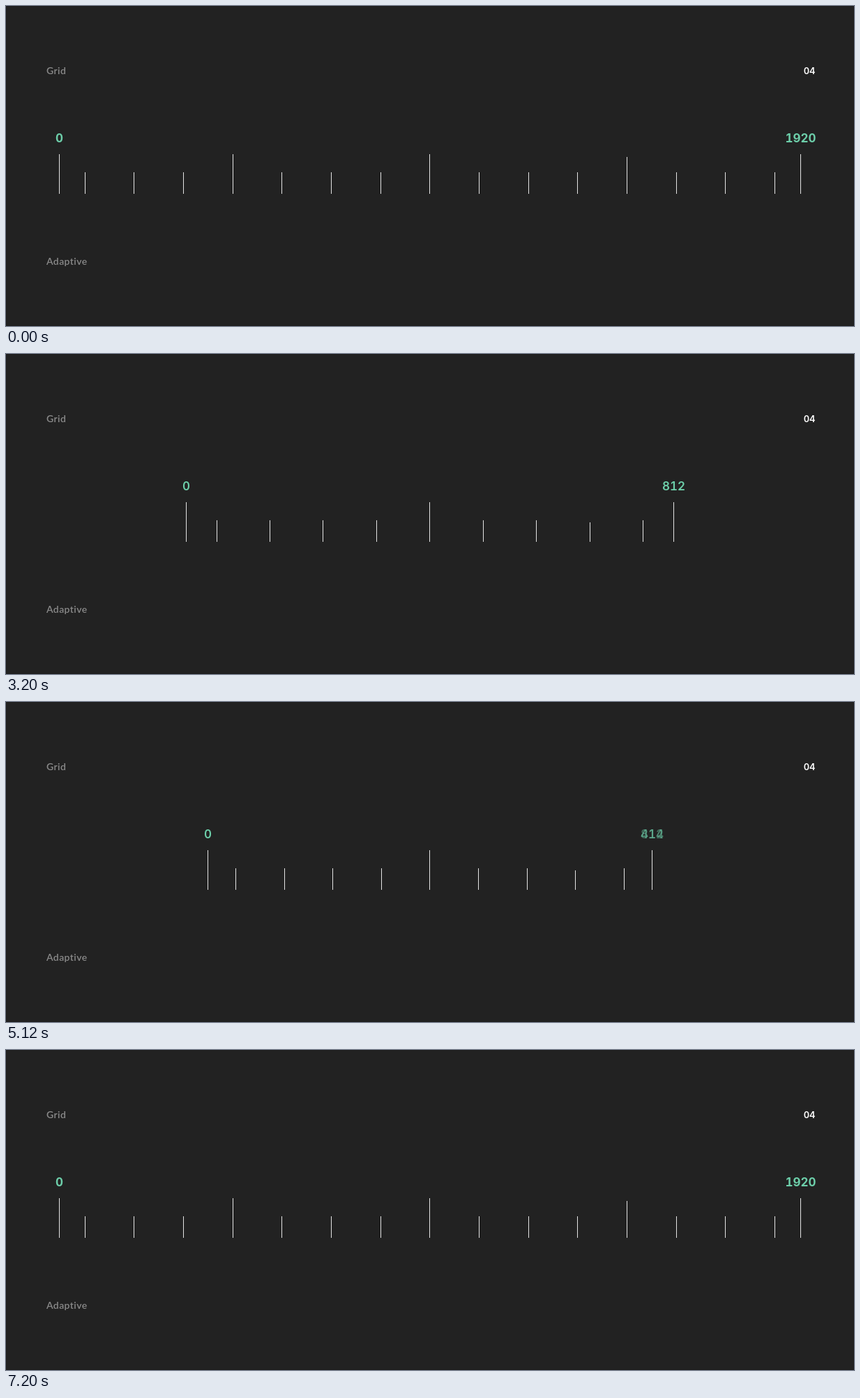
An HTML page for the animation above (7600 ms loop, 1216 px wide and 460 px high).

```html
<!DOCTYPE html>
<html lang="en">
<head>
<meta charset="utf-8">
<style>
  html, body { margin: 0; width: 100%; height: 100%; overflow: hidden; background: #222; }
  svg { display: block; }
  .name { font: 600 14px Lato, sans-serif; letter-spacing: .4px; fill: #8a8a8a; }
  .size, .count { font: 600 17px Inter, sans-serif; font-variant-numeric: tabular-nums; }
  .size { fill: #6dcfaa; text-anchor: middle; }
  .count { font-size: 13px; fill: #fff; text-anchor: end; }
</style>
</head>
<body>
<svg id="stage" width="1216" height="460" viewBox="0 0 1216 460">
  <rect x=".5" y=".5" width="1215" height="459" fill="none" stroke="#1c1c1c"/>
  <text class="name" x="58" y="98">Grid</text>
  <text class="name" x="58" y="372">Adaptive</text>
  <text class="count" x="1160.5" y="98">04</text>
</svg>
<script>
const LOOP = 7600, FRAME = 40, CENTER = 607.9, BOTTOM = 270;
const layouts = [
  { label: '1920', half: 531.6, step: 70.67 },
  { label: '812', half: 353.1, step: 77.25 },
  { label: '414', half: 180, step: 38.75 }
];
const moves = [
  { start: 1440, length: 300, from: 0, to: 1 },
  { start: 3164, length: 396, from: 1, to: 2 },
  { start: 4880, length: 340, from: 2, to: 1 },
  { start: 6610, length: 400, from: 1, to: 0 }
];

const stage = document.getElementById('stage');
function add(tag, attributes, text = '') {
  const node = document.createElementNS('http://www.w3.org/2000/svg', tag);
  for (const name in attributes) node.setAttribute(name, attributes[name]);
  node.textContent = text;
  return stage.appendChild(node);
}
const mix = (a, b, p) => a + (b - a) * p;
const clamp = v => Math.max(0, Math.min(1, v));

const makeTick = () => add('rect', { width: 1, fill: '#e4e4e4' });
function setTick(tick, x, top, opacity = 1) {
  tick.setAttribute('x', Math.floor(x));
  tick.setAttribute('y', top);
  tick.setAttribute('height', BOTTOM - top);
  tick.setAttribute('opacity', opacity);
}

const edges = [-1, 1].map(side => ({ side, tick: makeTick() }));
const ticks = Array.from({ length: 15 }, (_, i) => ({ slot: i - 7, tick: makeTick() }));
const zero = add('text', { class: 'size', y: 195.5 }, '0');
const labels = layouts.map(l => add('text', { class: 'size', y: 195.5 }, l.label));
labels[0].style.fontWeight = 700;

// Slot in the compact layouts for a tick of the wide one; undefined if it drops out.
const compactSlots = { 0: 0, 2: 1, 3: 2, 4: 3, 6: 4 };

function draw(time) {
  const move = moves.findLast(m => time >= m.start) || { start: 0, length: 1, from: 0, to: 0 };
  const t = clamp((time - move.start) / move.length);
  const p = (1 - Math.cos(Math.PI * t)) / 2;
  const a = layouts[move.from], b = layouts[move.to];
  const compact = mix(Math.min(move.from, 1), Math.min(move.to, 1), p);
  const half = mix(a.half, b.half, p);

  for (const { side, tick } of edges) setTick(tick, CENTER + side * half, 213);

  for (const { slot, tick } of ticks) {
    const target = compactSlots[Math.abs(slot)];
    if (target === undefined) {
      setTick(tick, CENTER + slot * layouts[0].step, 239, clamp(1 - 2 * compact));
      continue;
    }
    const offset = i => Math.sign(slot) * layouts[i].step * (i ? target : Math.abs(slot));
    const drift = slot ? 23 * compact * (1 - compact) : 0;
    const tall = slot === 0 ? 1 : Math.abs(slot) === 4 ? 1 - compact ** 2.5 : 0;
    const right = slot === 4;
    const top = mix(right ? 242 : 239, right ? 217 : 213, tall);
    setTick(tick, CENTER + mix(offset(move.from), offset(move.to), p) + drift, top);
  }

  zero.setAttribute('x', CENTER - half + .2);
  zero.style.fontWeight = compact < .5 ? 700 : 600;
  const fade = clamp(t * 2 - 1);
  labels.forEach((label, i) => {
    label.setAttribute('x', CENTER + half);
    label.setAttribute('opacity', i === move.to ? (move.from === move.to ? 1 : fade) : i === move.from ? 1 - fade : 0);
  });
}

function tick(now) {
  draw(Math.floor(now % LOOP / FRAME) * FRAME);
  requestAnimationFrame(tick);
}
draw(0);
requestAnimationFrame(tick);
</script>
</body>
</html>
```
